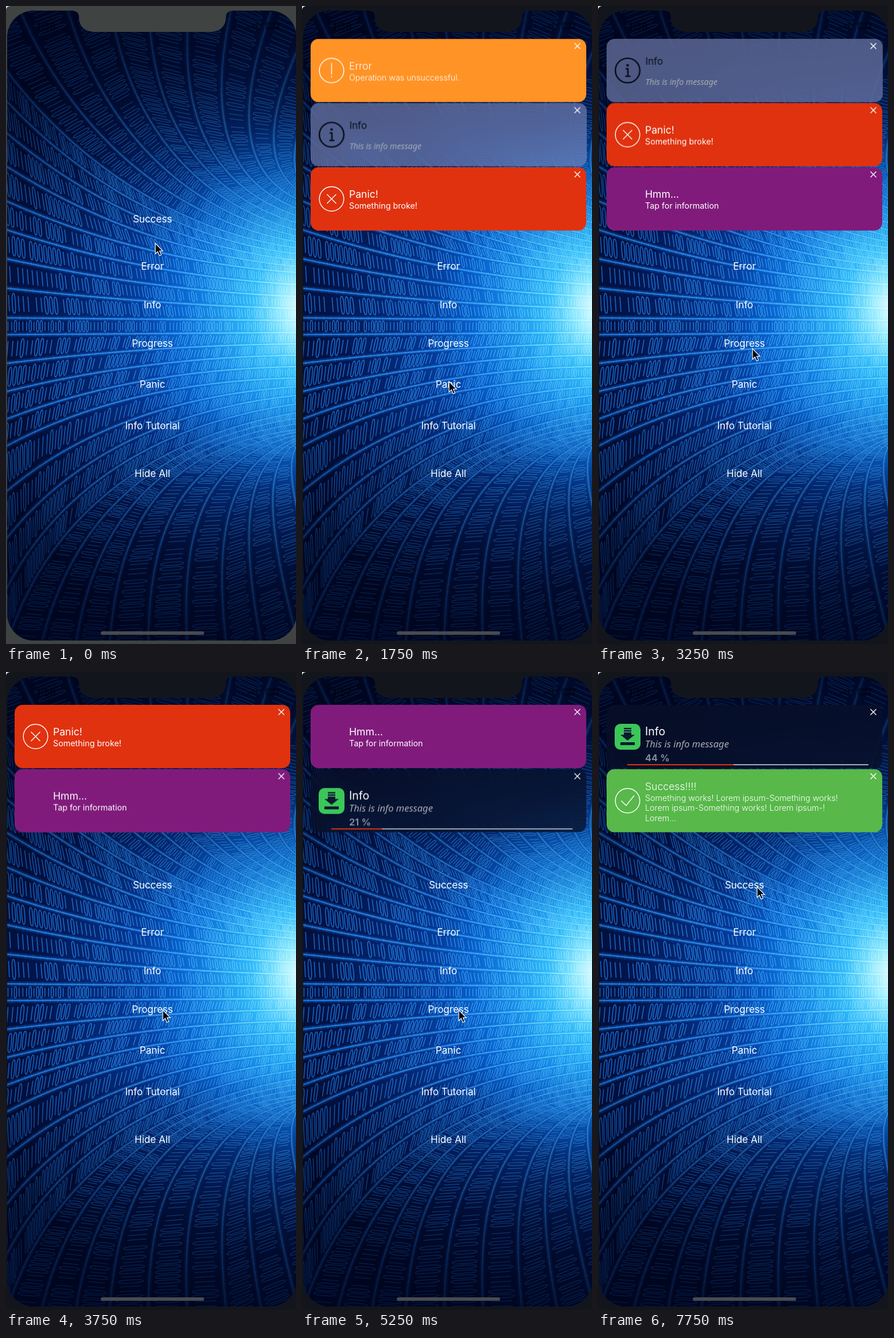
These frames come from a looping animation (505 by 1108 pixels, 8 s). An HTML page with a canvas:

```html
<!DOCTYPE html>
<html lang="en">
<head>
<meta charset="utf-8">
<title>Notification banners</title>
<style>
@property --n { syntax: "<integer>"; inherits: true; initial-value: 0; }
html, body { margin: 0; width: 100%; height: 100%; overflow: hidden; background: #12161c; }
#stage { position: relative; width: 505px; height: 1108px; overflow: hidden; font-family: Inter, sans-serif; }
#stage > canvas, #stage > svg { position: absolute; left: 0; top: 0; }
p { position: absolute; margin: 0; top: calc(var(--y) * 1px); line-height: 0; white-space: nowrap; }
.menu { left: 0; width: 510px; text-align: center; font-size: 17px; color: #fff; }
.clock { left: 53px; font-size: 17px; font-weight: 600; color: #000; opacity: .6; }

.card, .card *, .anim { animation: 8s step-end infinite; }
.card {
  position: absolute; left: 14.5px; top: 57px; width: 480.5px; height: 110px;
  border-radius: 14px; color: #fff; opacity: 0;
}
.card p { left: 67.5px; }
.card svg { position: absolute; left: 0; top: 0; fill: none; stroke: #fff; stroke-width: 1.4; }
.title { font-size: 17.6px; font-weight: 300; }
.text { font-size: 14.3px; font-weight: 300; }
.note { font: italic 14.2px/0 "Noto Sans", sans-serif; color: #a9aeb6; }

#ok { z-index: 6; background: #58b84a; animation-name: ok; }
#error { z-index: 5; background: #ff9326; animation-name: error; }
#info { z-index: 4; background: rgba(130,140,190,.6); backdrop-filter: blur(18px); animation-name: info; }
#info .title { color: #0a0f1e; font-weight: 400; font-size: 17px; }
#panic { z-index: 3; background: #e0320f; animation-name: panic; }
#panic p, #hmm p { font-weight: 400; }
#hmm { z-index: 2; background: #801b7c; animation-name: hmm; }
#load { z-index: 1; background: rgba(9,16,38,.74); backdrop-filter: blur(18px); animation-name: load, count; }
#load .title { font-size: 19.5px; font-weight: 400; }
#load .note { font-size: 16.5px; }
.percent { font-size: 16.5px; font-weight: 600; color: #8c94a3; counter-reset: n var(--n); }
.percent::before { content: counter(n) " %"; }
.bar { position: absolute; left: 36.5px; top: 102.5px; width: 420px; height: 2.5px; background: #a5abb5; }
.bar i { display: block; height: 100%; width: calc(var(--n) * 1%); background: #e0320f; }

#bezel { z-index: 7; }
#frame { animation-name: frame; }
#before { animation-name: before; }
#after { animation-name: after; }
#pressed { animation-name: pressed; }
#cursor { z-index: 8; overflow: visible; animation-name: cursor; }

@keyframes frame { 0% { fill: #3f4442; } 3.125%, 100% { fill: #12161c; } }
@keyframes before { 0% { opacity: .6; } 50%, 100% { opacity: 0; } }
@keyframes after { 0% { opacity: 0; } 50%, 100% { opacity: .6; } }
@keyframes pressed { 0%, 15.625%, 100% { opacity: 1; } 12.5% { opacity: .6; } }
@keyframes ok {
  0% { opacity: 0; translate: 0 -50px; }
  3.125% { opacity: .9; translate: 0 -50px; }
  6.25% { opacity: 1; translate: 0 0; }
  18.75% { opacity: 0; translate: 0 111.5px; }
  90.625%, 100% { opacity: 1; translate: 0 111.5px; }
}
@keyframes error {
  0% { opacity: 0; translate: 0 111.5px; }
  9.375% { opacity: 1; translate: 0 111.5px; }
  18.75% { opacity: 1; translate: 0 0; }
  31.25%, 100% { opacity: 0; translate: 0 0; }
}
@keyframes info {
  0% { opacity: 0; translate: 0 142px; scale: 1.006 1; }
  12.5% { opacity: .9; translate: 0 142px; scale: 1.006 1; }
  15.625% { opacity: 1; translate: 0 223px; scale: 1; }
  18.75% { opacity: 1; translate: 0 111.5px; scale: 1; }
  31.25% { opacity: 1; translate: 0 0; scale: 1; }
  46.875%, 100% { opacity: 0; translate: 0 0; scale: 1; }
}
@keyframes panic {
  0% { opacity: 0; translate: 0 150px; }
  18.75% { opacity: .9; translate: 0 150px; }
  21.875% { opacity: 1; translate: 0 223px; }
  31.25% { opacity: 1; translate: 0 111.5px; }
  46.875% { opacity: 1; translate: 0 0; }
  62.5%, 100% { opacity: 0; translate: 0 0; }
}
@keyframes hmm {
  0% { opacity: 0; translate: 0 150px; }
  34.375% { opacity: .9; translate: 0 150px; }
  37.5% { opacity: 1; translate: 0 223px; }
  46.875% { opacity: 1; translate: 0 111.5px; }
  62.5% { opacity: 1; translate: 0 0; }
  81.25%, 100% { opacity: 0; translate: 0 0; }
}
@keyframes load {
  0% { opacity: 0; translate: 0 223px; }
  50% { opacity: 1; translate: 0 223px; }
  62.5% { opacity: 1; translate: 0 111.5px; }
  81.25%, 100% { opacity: 1; translate: 0 0; }
}
@keyframes count {
  0% { --n: 0; }
  50% { --n: 8; animation-timing-function: steps(3); }
  59.375% { --n: 15; animation-timing-function: steps(2); }
  65.625% { --n: 21; animation-timing-function: steps(10); }
  96.875%, 100% { --n: 44; }
}
@keyframes cursor {
  0% { translate: 260px 412px; }
  3.125% { translate: 256px 376px; }
  6.25% { translate: 262px 455px; }
  9.375% { translate: 266px 522px; }
  12.5% { translate: 270px 557px; }
  15.625% { translate: 262px 620px; }
  18.75% { translate: 256px 652px; }
  25% { translate: 260px 700px; }
  28.125% { translate: 264px 728px; }
  34.375% { translate: 268px 690px; }
  37.5% { translate: 269px 610px; }
  40.625% { translate: 269px 595px; }
  46.875% { translate: 273px 587px; }
  87.5% { translate: 276px 480px; }
  90.625%, 100% { translate: 277px 373px; }
}
</style>
</head>
<body>
<div id="stage">
  <canvas id="tunnel" width="505" height="1108"></canvas>

  <p class="clock anim" id="before" style="--y:36">1:56</p>
  <p class="clock anim" id="after" style="--y:36">1:57</p>

  <p class="menu" style="--y:370">Success</p>
  <p class="menu" style="--y:452">Error</p>
  <p class="menu anim" id="pressed" style="--y:519">Info</p>
  <p class="menu" style="--y:586">Progress</p>
  <p class="menu" style="--y:657">Panic</p>
  <p class="menu" style="--y:729">Info Tutorial</p>
  <p class="menu" style="--y:812">Hide All</p>

  <div class="card" id="ok">
    <svg width="480" height="110"><use href="#close"/><use href="#ring"/><path d="M25.500 55l8.500 8.500 14-17.500"/></svg>
    <p class="title" style="--y:30">Success!!!!</p>
    <p class="text" style="--y:49.500">Something works! Lorem ipsum-Something works!</p>
    <p class="text" style="--y:67">Lorem ipsum-Something works! Lorem ipsum-!</p>
    <p class="text" style="--y:84.500">Lorem...</p>
  </div>
  <div class="card" id="error">
    <svg width="480" height="110"><use href="#close"/><use href="#ring"/><path d="M36.500 42v20m0 3v2.500"/></svg>
    <p class="title" style="--y:47">Error</p>
    <p class="text" style="--y:67">Operation was unsuccessful.</p>
  </div>
  <div class="card" id="info">
    <svg width="480" height="110"><use href="#close"/>
      <g stroke="#0a0f1e" stroke-width="2.6"><use href="#ring"/><path d="M33 52h4v13m-4.500 0h9"/></g>
      <circle cx="36.500" cy="46" r="2.200" fill="#0a0f1e" stroke="none"/></svg>
    <p class="title" style="--y:39">Info</p>
    <p class="note" style="--y:75">This is info message</p>
  </div>
  <div class="card" id="panic">
    <svg width="480" height="110"><use href="#close"/><use href="#ring"/><path d="M28.500 47l16 16m0-16l-16 16"/></svg>
    <p class="title" style="--y:47">Panic!</p>
    <p class="text" style="--y:67">Something broke!</p>
  </div>
  <div class="card" id="hmm">
    <svg width="480" height="110"><use href="#close"/></svg>
    <p class="title" style="--y:47">Hmm...</p>
    <p class="text" style="--y:67">Tap for information</p>
  </div>
  <div class="card" id="load">
    <svg width="480" height="110"><use href="#close"/>
      <g stroke="none"><rect x="14" y="33" width="45" height="45" rx="10" fill="#3cc65a"/>
      <path fill="#0b1a30" d="M30 40h13v2.500h-13zM30 44h13v2.500h-13zM30 48h13v4h6L36.500 62 24 52h6zM24 65h25v5h-25z"/></g></svg>
    <p class="title" style="--y:46">Info</p>
    <p class="note" style="--y:68">This is info message</p>
    <p class="percent" style="--y:92"></p>
    <div class="bar"><i></i></div>
  </div>

  <svg id="bezel" width="505" height="1108">
    <defs>
      <path id="close" d="M459.500 7.500l10 10m0-10l-10 10"/>
      <circle id="ring" cx="36.500" cy="55" r="21.300"/>
    </defs>
    <path id="frame" class="anim" fill-rule="evenodd" d="M0 0H505V1108H0ZM48 8H113Q127 8 127 19C127 36 138 45 156 45H354C372 45 383 36 383 19Q383 8 397 8H460A46 46 0 0 1 506 54V1056A46 46 0 0 1 460 1102H48A46 46 0 0 1 2 1056V54A46 46 0 0 1 48 8Z"/>
    <path d="M0 0H7Q1 1 0 6Z" fill="#cfe6ec"/>
    <path d="M422 39v-3m5 3v-6m5 6v-8m5 8v-10M454 30h20v9h-20z" fill="none" stroke="#000" stroke-width="3" opacity=".45"/>
    <rect x="165" y="1086" width="180" height="6" rx="3" fill="#484b4f"/>
  </svg>
  <svg id="cursor" class="anim" width="14" height="22">
    <path d="M0 0V18.500L4.200 14.600 7.200 21.500 10.400 20.100 7.400 13.400H13Z" fill="#05070c" stroke="#fff" stroke-width="1.200"/>
  </svg>
</div>
<script>
const ctx = document.getElementById('tunnel').getContext('2d');
const W = 505, H = 1108, MID = 545;

// Guide rails: rail index, then the four points of a cubic curve.
const upper = [
  [0, -60,541, 170,543, 340,545, 508,546],
  [4, -60,310, 130,405, 320,450, 508,463],
  [8, -60,20, 60,230, 270,390, 508,420],
  [11, 175,-60, 190,150, 290,330, 508,390],
  [14, 398,-20, 340,220, 400,310, 508,352],
  [16, 525,40, 430,230, 470,290, 508,320]
];
const lower = [
  [0, -60,571, 170,570, 340,568, 508,567],
  [4, -60,800, 110,690, 305,650, 508,646],
  [8, -10,1150, 50,900, 240,750, 508,706],
  [11, 178,1160, 185,920, 250,770, 508,735],
  [14, 390,1160, 350,880, 400,790, 508,750],
  [16, 510,1110, 440,850, 460,790, 508,757]
];

function rail(keys, k) {
  let i = 1;
  while (i < keys.length - 1 && keys[i][0] < k) i++;
  const a = keys[i - 1], b = keys[i], f = (k - a[0]) / (b[0] - a[0]);
  return a.slice(1).map((v, j) => v + (b[j + 1] - v) * f);
}

function point(c, t) {
  const s = 1 - t, w = [s * s * s, 3 * s * s * t, 3 * s * t * t, t * t * t];
  return [0, 1].map(d => w.reduce((sum, v, i) => sum + v * c[2 * i + d], 0));
}

let seed = 7;
const random = () => (seed = seed * 16807 % 2147483647) / 2147483647;

function radial(x, y, r, stops) {
  const g = ctx.createRadialGradient(x, y, 0, x, y, r);
  stops.forEach(([at, color]) => g.addColorStop(at, color));
  return g;
}

function drawRail(c) {
  const n = 48;
  for (const [wide, alpha] of [[3, .22], [1, .9]]) {
    ctx.globalAlpha = alpha;
    for (let i = 0; i < n; i++) {
      ctx.lineWidth = wide * (3.1 - 2.3 * i / n);
      ctx.beginPath();
      ctx.moveTo(...point(c, i / n));
      ctx.lineTo(...point(c, (i + 1.1) / n));
      ctx.stroke();
    }
  }
}

// One row of binary digits, skewed to lie between two rails.
function drawDigits(a, b) {
  const center = t => {
    const p = point(a, t), q = point(b, t);
    return [(p[0] + q[0]) / 2, (p[1] + q[1]) / 2, q[0] - p[0], q[1] - p[1]];
  };
  ctx.globalAlpha = .85;
  for (let t = 0; t < 1;) {
    const [x, y, cx, cy] = center(t), next = center(t + .004);
    const dx = next[0] - x, dy = next[1] - y, speed = Math.hypot(dx, dy);
    const pitch = Math.min(8.5, 3 + Math.hypot(cx, cy) * .12);
    const w = pitch * .32 / speed;
    ctx.lineWidth = 1.6 - t * .8;
    ctx.beginPath();
    ctx.setTransform(dx * w, dy * w, cx * .23, cy * .23, x, y);
    if (random() < .55) {
      ctx.moveTo(1, -.5);
      ctx.arc(0, -.5, 1, 0, Math.PI, true);
      ctx.lineTo(-1, .5);
      ctx.arc(0, .5, 1, Math.PI, 0, true);
      ctx.closePath();
    } else {
      ctx.moveTo(0, -1.2);
      ctx.lineTo(0, 1.2);
    }
    ctx.setTransform(1, 0, 0, 1, 0, 0);
    ctx.stroke();
    t += .004 * pitch / speed * (random() < .06 ? 1.7 : 1);
  }
}

ctx.fillStyle = radial(545, 535, 640, [
  [0, '#39b4ff'], [.2, '#1488ee'], [.38, '#0858c4'], [.55, '#043188'],
  [.75, '#02164f'], [1, '#010722']
]);
ctx.fillRect(0, 0, W, H);

ctx.strokeStyle = radial(540, 535, 640, [
  [0, '#d6fbff'], [.2, '#74d4ff'], [.42, '#35a2ff'], [.8, '#1c78e2'], [1, '#1259b8']
]);
drawDigits(rail(upper, 0), rail(lower, 0));
for (const keys of [upper, lower]) {
  for (let k = 0; k < 18; k++) {
    if (k < 17) drawDigits(rail(keys, k), rail(keys, k + 1));
    drawRail(rail(keys, k));
  }
}
ctx.globalAlpha = 1;

const shade = ctx.createLinearGradient(0, 0, 0, H);
[[0, .78], [.12, .62], [.28, .2], [.38, 0], [.62, 0], [.74, .25], [.88, .62], [1, .8]]
  .forEach(([at, alpha]) => shade.addColorStop(at, `rgba(0,5,30,${alpha})`));
ctx.fillStyle = shade;
ctx.fillRect(0, 0, W, H);

ctx.globalCompositeOperation = 'screen';
ctx.translate(522, MID - 20);
ctx.scale(.85, 1);
ctx.fillStyle = radial(0, 0, 330, [
  [0, 'rgba(240,255,255,1)'], [.16, 'rgba(150,235,255,.85)'], [.34, 'rgba(50,170,255,.6)'],
  [.65, 'rgba(20,120,255,.28)'], [1, 'rgba(0,80,220,0)']
]);
ctx.fillRect(-700, -600, 800, 1300);
</script>
</body>
</html>
```
